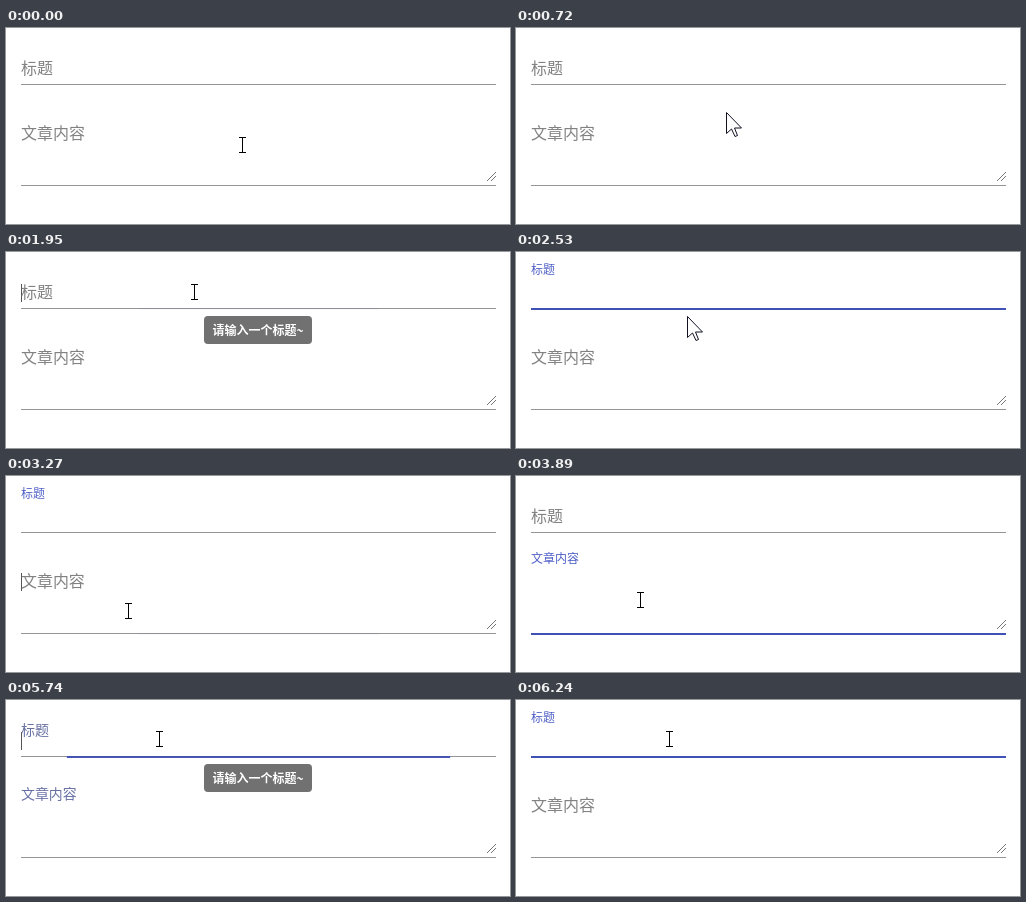
An HTML page with a canvas that plays this animation: 504 px wide and 196 px high, repeating every 6.36 s.

```html
<!DOCTYPE html>
<html lang="zh-CN">
<head>
<meta charset="utf-8">
<style>
  html, body { margin: 0; width: 100%; height: 100%; overflow: hidden; background: #fff; }
  canvas { display: block; }
</style>
</head>
<body>
<canvas id="stage" width="504" height="196"></canvas>
<script>
const c = document.getElementById('stage').getContext('2d');
const LOOP = 6360, LEFT = 15, WIDTH = 475, BLINK = 530;
const FONT = '"Noto Sans CJK SC", "Noto Sans CJK", sans-serif';
const GRAY = [130, 130, 130], BLUE = [78, 95, 198];

// Clicks that move the focus: title, content, title
const CLICKS = [1950, 3270, 5680];
const title = { text: '标题', rest: 46, line: 56, focus: [[CLICKS[0], CLICKS[1]], [CLICKS[2], LOOP]] };
const content = { text: '文章内容', rest: 111, line: 157, focus: [[CLICKS[1], CLICKS[2]]] };

// The tooltip opens on hover and closes shortly after a click
const tips = [[1280, CLICKS[0] + 90], [4968, CLICKS[2] + 90]];

// Pointer key points: time, x, y
const path = [
  [0, 236, 117], [370, 236, 117], [720, 210, 84], [1450, 188, 40], [2300, 188, 40], [3200, 122, 135],
  [3290, 122, 135], [3880, 124, 125], [4530, 144, 63], [5000, 151, 47], [5500, 153, 39], [LOOP, 153, 39]
];
const arrow = new Path2D('M.5 .5V21.5L5.5 17L9 24.5L11.5 23.5L8.5 16H15.5Z');

const clamp = v => Math.min(1, Math.max(0, v));
const mix = (a, b, k) => a + (b - a) * k;

function bezier(x1, y1, x2, y2) {
  const at = (a, b, s) => 3 * (1 - s) * (1 - s) * s * a + 3 * (1 - s) * s * s * b + s * s * s;
  return x => {
    if (x <= 0 || x >= 1) return clamp(x);
    let lo = 0, hi = 1;
    for (let i = 0; i < 24; i++) {
      const mid = (lo + hi) / 2;
      if (at(x1, x2, mid) < x) lo = mid; else hi = mid;
    }
    return at(y1, y2, lo);
  };
}
const swift = bezier(.25, .8, .25, 1);
const decelerate = bezier(0, 0, .2, 1);

function rect(color, x, y, w, h) {
  c.fillStyle = color;
  c.fillRect(x, y, w, h);
}

function drawField(f, t) {
  const last = f.focus.filter(([start]) => t >= start).pop();
  const focused = last && t < last[1];
  const lift = !last ? 0 : focused ? swift((t - last[0]) / 400) : 1 - swift((t - last[1]) / 400);

  rect('#949494', LEFT, f.line, WIDTH, 1);
  if (focused) {
    const age = t - last[0];
    const w = WIDTH * mix(.5, 1, swift(age / 300));
    c.globalAlpha = swift(age / 100);
    rect('#3f51b5', LEFT + (WIDTH - w) / 2, f.line, w, 2);
    c.globalAlpha = 1;
    if (age % (2 * BLINK) < BLINK) rect('#555', LEFT, f.rest - 14, 1, 18);
  }

  c.fillStyle = `rgb(${GRAY.map((v, i) => Math.round(mix(v, BLUE[i], lift)))})`;
  c.font = `${mix(16, 12, lift)}px ${FONT}`;
  c.textAlign = 'left';
  c.fillText(f.text, LEFT, f.rest - 23.7 * lift);
}

function drawGrip() {
  for (let i = 0; i < 9; i++) {
    rect('#777', 481 + i, 152 - i, 1, 1);
    if (i < 5) rect('#777', 485 + i, 152 - i, 1, 1);
  }
}

function drawTip(t) {
  const tip = tips.find(([show, hide]) => t > show && t < hide + 100);
  if (!tip) return;
  const p = decelerate((t - tip[0]) / 200);
  const scale = p < .5 ? p * 1.98 : mix(.99, 1, p * 2 - 1);
  c.save();
  c.translate(252, 64);
  c.scale(scale, scale);
  c.globalAlpha = p * (1 - decelerate((t - tip[1]) / 100));
  c.fillStyle = '#717171';
  c.beginPath();
  c.roundRect(-54, 0, 108, 28, 4);
  c.fill();
  // White text over a white page keeps its colour while the box fades
  c.globalAlpha = 1;
  c.fillStyle = '#fff';
  c.font = `bold 12px ${FONT}`;
  c.textAlign = 'center';
  c.fillText('请输入一个标题~', 0, 19);
  c.restore();
}

function drawPointer(t) {
  const i = path.findIndex(p => p[0] > t);
  const a = path[i - 1], b = path[i], k = (t - a[0]) / (b[0] - a[0]);
  const x = Math.round(mix(a[1], b[1], k)), y = Math.round(mix(a[2], b[2], k));
  if (y > 50 && y < 96) {
    c.save();
    c.translate(x, y);
    c.fillStyle = '#fff';
    c.fill(arrow);
    c.strokeStyle = '#112';
    c.stroke(arrow);
    c.restore();
  } else {
    rect('#000', x, y - 8, 1, 16);
    for (const edge of [y - 8, y + 7]) rect('#000', x - 3, edge, 7, 1);
  }
}

function draw(now) {
  const t = now % LOOP;
  rect('#fff', 0, 0, 504, 196);
  drawField(title, t);
  drawField(content, t);
  drawGrip();
  drawTip(t);
  drawPointer(t);
  requestAnimationFrame(draw);
}
requestAnimationFrame(draw);
</script>
</body>
</html>
```
